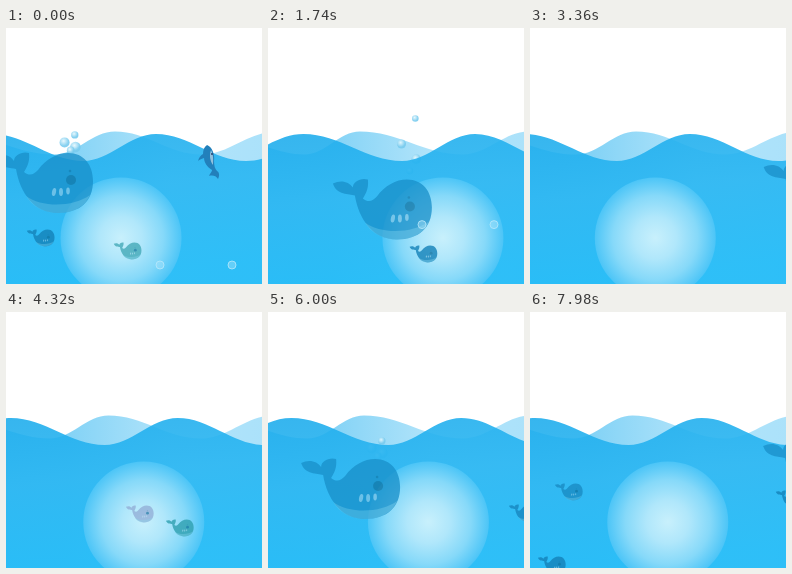
An HTML page for the animation above (8000 ms loop, 256x256 px).

```html
<!DOCTYPE html>
<html lang="en">
<head>
<meta charset="utf-8">
<title>Ocean</title>
<style>
html, body { margin: 0; width: 100%; height: 100%; overflow: hidden; background: #fff; }
svg { display: block; width: 100vw; height: 100vh; }
</style>
</head>
<body>
<svg viewBox="0 0 256 256">
  <defs>
    <linearGradient id="back" x2="1" y2="0">
      <stop offset="0" stop-color="#79cff6"/>
      <stop offset=".3" stop-color="#84d3f6"/>
      <stop offset=".55" stop-color="#b2e4fa"/>
      <stop offset="1" stop-color="#a4dffa"/>
    </linearGradient>
    <linearGradient id="front" x2=".35" y2="1">
      <stop offset="0" stop-color="#1eabeb"/>
      <stop offset=".5" stop-color="#29b6f2"/>
      <stop offset="1" stop-color="#20bbf7"/>
    </linearGradient>
    <radialGradient id="shine">
      <stop offset="0" stop-color="#c8f0fc"/>
      <stop offset=".35" stop-color="#b0e7fb"/>
      <stop offset=".7" stop-color="#86d9f9"/>
      <stop offset="1" stop-color="#4cc5f7"/>
    </radialGradient>
    <radialGradient id="drop" cx=".4" cy=".35">
      <stop offset="0" stop-color="#e6f8fe"/>
      <stop offset="1" stop-color="#79cbee"/>
    </radialGradient>
    <g id="whale">
      <path fill="currentColor" d="M-40-14C-46-16-58-14-62-26C-54-30-46-28-42-22C-42-28-34-32-27-30C-26-21-29-16-32-11C-26-6-22-9-18-13C-10-24 1-30 12-30C28-30 37-18 37-2C37 18 24 30 2 30C-22 30-36 10-40-14Z"/>
      <path fill="#7fd0e8" opacity=".4" d="M-30 13C-14 25 18 24 34 12C29 24 17 30 2 30C-13 30-24 23-30 13Z"/>
      <circle cx="15" cy="-3" r="5" fill="#0b6b98" opacity=".75"/>
      <circle cx="14" cy="-12" r="1.3" fill="#0b6b98" opacity=".6"/>
      <g fill="#c0e6f7" opacity=".6">
        <ellipse cx="-2" cy="9" rx="2" ry="4" transform="rotate(12 -2 9)"/>
        <ellipse cx="5" cy="9" rx="2" ry="4"/>
        <ellipse cx="12" cy="8" rx="1.8" ry="3.4"/>
      </g>
    </g>
  </defs>
  <path id="waveB" fill="url(#back)"/>
  <g id="spout"></g>
  <path id="waveA" fill="url(#front)" opacity=".9"/>
  <circle id="glow" r="60.5" fill="url(#shine)"/>
  <g id="dolphin">
    <path d="M-2-16C3-14 6-7 5 0C5 5 6 8 8 10C10 11 11 14 9 18C7 15 4 14 0 15C1 12 3 11 3 9C-2 6-5 1-5-3C-8-2-10-1-11 0C-10-4-8-6-6-7C-6-11-5-14-2-16Z"/>
    <path fill="#fff" opacity=".5" d="M2-11C5-5 4 1 4 4C1 0 0-6 2-11Z"/>
    <circle cx="3" cy="-7" r="1" fill="#24416f"/>
  </g>
  <g id="school"></g>
  <use id="big" href="#whale" color="#1990ca" opacity=".76"/>
  <g id="bubbles"></g>
</svg>
<script>
const LOOP = 8000, SWAY = 3660, SPEED = 0.23;
const $ = id => document.getElementById(id);

function add(parent, tag, attrs) {
  const el = document.createElementNS('http://www.w3.org/2000/svg', tag);
  for (const k in attrs) el.setAttribute(k, attrs[k]);
  return $(parent).appendChild(el);
}
const place = (el, x, y, s = 1) =>
  el.setAttribute('transform', `translate(${x.toFixed(2)} ${y.toFixed(2)}) scale(${s})`);
const show = (el, on) => el.setAttribute('visibility', on ? 'visible' : 'hidden');

// Small whales: time of entry, height, colour
const school = [
  [-165, 210, '#1482b9'], [-543, 223, '#45aab8'], [1050, 226, '#1482b9'],
  [3724, 202, '#93b0d8'], [3550, 216, '#2fa0b0'], [4878, 201, '#1787c0'],
  [6837, 187, '#1482b9'], [7797, 180, '#1a8cc4'], [7871, 253, '#1482b9']
].map(([start, y, color]) => ({
  start, y, el: add('school', 'use', { href: '#whale', color, opacity: 0.8 })
}));

const bubbles = [154, 226].map(x => ({
  x, el: add('bubbles', 'circle', { r: 4, fill: '#a6e2fa', 'fill-opacity': 0.45, stroke: '#b9e9fb', 'stroke-width': 0.8 })
}));

// Spray: sideways spread, height, radius
const drops = [[7, 72, 3.8], [-8, 42, 5.2], [8, 24, 5.5], [1, 10, 4]].map(([dx, h, r]) => ({
  dx, h, el: add('spout', 'circle', { r, fill: 'url(#drop)', opacity: 0.9 })
}));
const bursts = [-80, 1420, 2920, 5920, 7420];

// Big whale path: time, x, y
const passes = [
  [[0, 50, 155], [1020, 60, 182], [2400, 188, 181], [3400, 300, 165]],
  [[4600, -45, 178], [6000, 95, 177], [7020, 200, 176], [8000, 297, 160]]
];

function along(points, t) {
  for (let i = 1; i < points.length; i++) {
    const [t0, x0, y0] = points[i - 1], [t1, x1, y1] = points[i];
    if (t <= t1) {
      const k = (t - t0) / (t1 - t0), e = k * k * (3 - 2 * k);
      return [x0 + (x1 - x0) * k, y0 + (y1 - y0) * e];
    }
  }
  return points[points.length - 1].slice(1);
}

// Smooth line through alternating crests and troughs
function wave(xs, ys) {
  let d = `M${xs[0]} ${ys[0]}`;
  for (let i = 1; i < xs.length; i++) {
    const a = xs[i - 1], b = xs[i], h = (b - a) * 0.37;
    d += `C${a + h} ${ys[(i - 1) % 2]} ${b - h} ${ys[i % 2]} ${b} ${ys[i % 2]}`;
  }
  return d + `V260H${xs[0]}Z`;
}

function draw(t) {
  // Linear sway there and back
  const u = 1 - Math.abs(1 - 2 * (t / SWAY % 1));

  $('waveA').setAttribute('d', wave(
    [-180 + 52 * u, -97 + 52 * u, -14 + 52 * u, 77 + 60 * u, 150 + 60 * u, 240 + 52 * u, 325 + 52 * u], [106, 133]));
  $('waveB').setAttribute('d', wave(
    [-60, 48 - 12 * u, 109 - 18 * u, 195, 270 - 10 * u, 350], [103.5, 126.5]));
  place($('glow'), 115 + 63 * u, 210);

  const rise = Math.min(1, Math.max(0, (t - 80) / 200));
  const mix = (a, b) => Math.round(a + (b - a) * rise);
  place($('dolphin'), 203 + 0.0295 * t, 133 - 0.1175 * t);
  $('dolphin').setAttribute('fill', `rgb(${mix(34, 91)},${mix(128, 124)},${mix(187, 173)})`);
  show($('dolphin'), t < 1400);

  for (const f of school) {
    const x = (t - f.start) * SPEED;
    show(f.el, x > -20 && x < 280);
    place(f.el, x, f.y, 0.28);
  }

  const pass = passes.find(p => t >= p[0][0] && t <= p[p.length - 1][0]);
  const [x, y] = pass ? along(pass, t) : [-99, 180];
  show($('big'), pass);
  place($('big'), x, y);

  const start = bursts.find(s => t >= s && t < s + 1000);
  for (const d of drops) {
    const k = (t - start) / 1000;
    show(d.el, pass && start !== undefined);
    if (start !== undefined)
      place(d.el, x + 14 + d.dx * Math.min(1, 0.6 + k), y - 30 - d.h * Math.sin(Math.PI * k), 1 - k * 0.4);
  }

  const by = 237 - Math.max(0, t - 1020) * 0.056;
  for (const b of bubbles) {
    show(b.el, by > 132);
    place(b.el, b.x, by);
  }
}

function tick() {
  draw(performance.now() % LOOP);
  requestAnimationFrame(tick);
}
tick();
</script>
</body>
</html>
```
